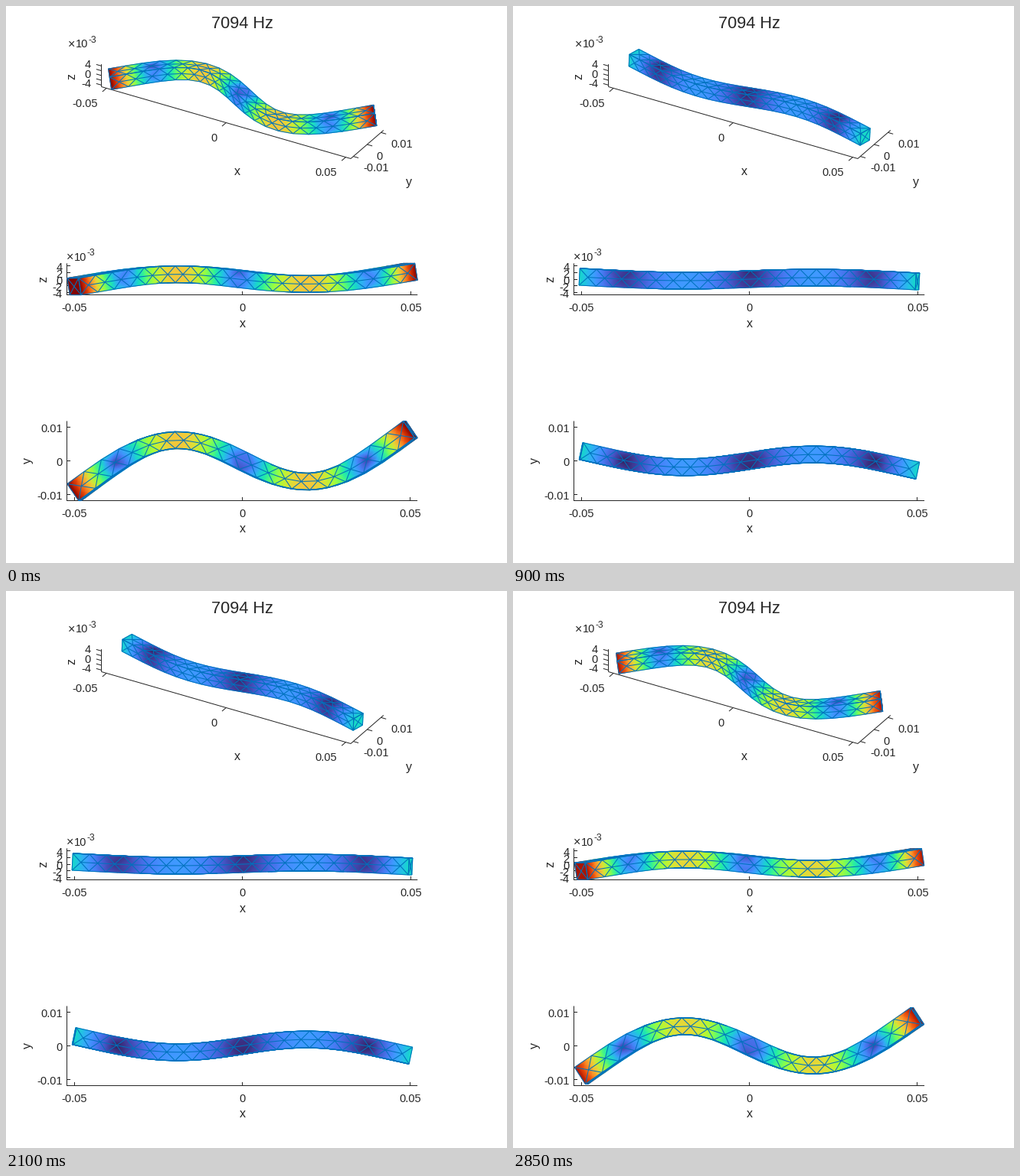
These frames come from a looping animation (654x728 px, 3 s). A matplotlib script:

```python
import numpy as np
import matplotlib.pyplot as plt
from matplotlib.animation import FuncAnimation
from matplotlib.collections import LineCollection, TriMesh
from matplotlib.tri import Triangulation

W, H = 654, 728
FRAMES, INTERVAL = 20, 150
INK, EDGE = "#262626", "#0072BD"

# Beam and mode shape, lengths in mm
LENGTH, HALF, CELLS = 100.0, 2.5, 20
AMP_Y, AMP_Z = 9.36, 2.2
WAVE = 7.8532          # second free-free bending eigenvalue
TILT = 0.92            # section rotation relative to the slope
LIM_X, LIM_Y, LIM_Z = 52.1, 11.86, 4.7

plt.rcParams["font.family"] = "Liberation Sans"
fig = plt.figure(figsize=(W / 72, H / 72), dpi=72, facecolor="white")
ax = fig.add_axes([0, 0, 1, 1])
ax.set_xlim(0, W)
ax.set_ylim(H, 0)
ax.axis("off")


# ---------- mesh ----------
def side_face(turn):
    """One long face: a triangular lattice with a row of mid nodes."""
    n = CELLS
    edge = np.linspace(-LENGTH / 2, LENGTH / 2, n + 1)
    mid = (edge[:-1] + edge[1:]) / 2
    x = np.concatenate([edge, edge, mid])
    a = np.repeat([-HALF, HALF, 0], [n + 1, n + 1, n])
    c, s = [(1, 0), (0, 1), (-1, 0), (0, -1)][turn]
    points = np.column_stack([x, a * c - HALF * s, a * s + HALF * c])

    top, centre = n + 1, 2 * n + 2
    tris = [(0, centre, top), (n, top + n, centre + n - 1)]
    for i in range(n):
        b, t, m = i, top + i, centre + i
        tris += [(b, b + 1, m), (t, m, t + 1)]
        if i < n - 1:
            tris += [(m, b + 1, m + 1), (m, m + 1, t + 1)]
    return points, np.array(tris)


def end_face(sign):
    """A square cap split into four triangles around its middle."""
    y = HALF * np.array([-1, 1, 1, -1, 0])
    z = HALF * np.array([-1, -1, 1, 1, 0])
    points = np.column_stack([np.full(5, sign * LENGTH / 2), y, z])
    tris = np.array([(k, (k + 1) % 4, 4) for k in range(4)])
    return points, tris if sign > 0 else tris[:, ::-1]


def join(parts):
    points, tris, start = [], [], 0
    for p, t in parts:
        points.append(p)
        tris.append(t + start)
        start += len(p)
    return np.vstack(points), np.vstack(tris)


def splitter(n):
    """Barycentric weights and triangles that split a triangle n by n."""
    spots = [(i, j) for i in range(n + 1) for j in range(n + 1 - i)]
    at = {p: k for k, p in enumerate(spots)}
    weights = np.array([(n - i - j, i, j) for i, j in spots]) / n
    tris = []
    for i, j in spots:
        if i + j < n:
            tris.append((at[i, j], at[i + 1, j], at[i, j + 1]))
        if i + j < n - 1:
            tris.append((at[i + 1, j], at[i + 1, j + 1], at[i, j + 1]))
    return weights, np.array(tris)


REST, TRIS = join([side_face(k) for k in range(4)]
                  + [end_face(-1), end_face(1)])
WEIGHTS, SUBTRIS = splitter(3)


def mode_shift(p):
    x, y, z = p.T
    u, e = WAVE * x / LENGTH, WAVE / 2
    shape = (np.sin(u) / np.sin(e) + np.sinh(u) / np.sinh(e)) / 2
    slope = (np.cos(u) / np.sin(e) + np.cosh(u) / np.sinh(e)) / 2
    slope *= WAVE / LENGTH * TILT
    return np.column_stack([-(y * AMP_Y + z * AMP_Z) * slope,
                            AMP_Y * shape, AMP_Z * shape])


SHIFT = mode_shift(REST)
SIZE = np.linalg.norm(SHIFT, axis=1)
SIZE /= SIZE.max()


# ---------- views: (origin in px, px per mm, right vector, up vector) ----------
R3 = np.sqrt(3) / 2
ISO = ((308.7, 119.3), 3.607, (R3, 0.5, 0), (-0.25, R3 / 2, R3))
FRONT = ((308.5, 357.0), 4.39, (1, 0, 0), (0, 0, 1))
ABOVE = ((308.5, 594.5), 4.387, (1, 0, 0), (0, 1, 0))
VIEWS = (ISO, FRONT, ABOVE)


def project(p, view):
    (ox, oy), scale, right, up = view
    p = np.asarray(p, float)
    return np.stack([ox + scale * (p @ np.array(right)),
                     oy - scale * (p @ np.array(up))], axis=-1)


# ---------- axes and lettering ----------
def line(p, q):
    ax.plot([p[0], q[0]], [p[1], q[1]], color=INK, lw=1, zorder=1,
            solid_capstyle="butt", snap=False)


def pixel(v):
    """Centre of the pixel that holds v."""
    return np.floor(v) + 0.5


def text(x, base, s, size=14.67, ha="center", turn=0):
    ax.text(x, base, s, size=size, color=INK, ha=ha, va="baseline",
            rotation=turn, rotation_mode="anchor", zorder=1)


def ticklabel(x, y, s, ha="center"):
    text(x, y + 5.3, s, ha=ha)


def exponent(x, base):
    text(x, base, "×", 16)
    text(x + 5.3, base, "10", ha="left")
    text(x + 22, base - 7, "-3", 12, ha="left")


def iso_axes():
    def spot(x, y, z=-LIM_Z):
        return project((x, y, z), ISO)

    def tick(p, direction):
        d = np.array(direction)
        line(p, p + 7 * d / np.hypot(*d))

    near, far = spot(-LIM_X, -LIM_Y), spot(LIM_X, -LIM_Y)
    top = spot(-LIM_X, -LIM_Y, LIM_Z)
    line((pixel(near[0]), near[1]), (pixel(top[0]), top[1]))
    line(near, far)
    line(far, spot(LIM_X, LIM_Y))
    for v in (-4, -2, 0, 2, 4):
        tick(spot(-LIM_X, -LIM_Y, v), (-R3, -0.25))
    for v in (-50, 0, 50):
        tick(spot(v, -LIM_Y), (-0.5, R3 / 2))
    for v in (-10, 0, 10):
        tick(spot(LIM_X, v), (R3, 0.25))

    for s, y in (("4", 76), ("0", 88.5), ("-4", 100.5)):
        ticklabel(111, y, s, "right")
    for s, x, y in (("-0.05", 103, 127), ("0", 272, 172), ("0.05", 418, 217),
                    ("0.01", 517, 180), ("0", 488, 196), ("-0.01", 483, 211)):
        ticklabel(x, y, s)
    exponent(86, 54.5)
    text(302, 221, "x", 16)
    text(526, 235, "y", 16)
    text(90, 92, "z", 16, turn=90)


def flat_axes(view, limit, ticks, label_x, name, name_x):
    (ox, oy), scale = view[:2]
    left, right = pixel(ox - LIM_X * scale), ox + LIM_X * scale
    low, high = pixel(oy + limit * scale), oy - limit * scale
    line((left, high), (left, low + 0.5))
    line((left, low), (right, low))
    for v, s in ((-50, "-0.05"), (0, "0"), (50, "0.05")):
        x = pixel(ox + v * scale)
        line((x, low), (x, low - 4.6))
        ticklabel(x, low + 16, s)
    for v, s in ticks:
        y = pixel(oy - v * scale)
        line((left, y), (left + 4.6, y))
        ticklabel(label_x, y + 0.8, s, "right")
    text(309, low + 42, "x", 16)
    text(name_x, oy, name, 16, turn=90)


text(308, 29, "7094 Hz", 21.8)
iso_axes()
flat_axes(FRONT, LIM_Z, [(v, str(v)) for v in (-4, -2, 0, 2, 4)], 73.5, "z", 53)
flat_axes(ABOVE, LIM_Y, [(-10, "-0.01"), (0, "0"), (10, "0.01")], 74, "y", 33)
exponent(84, 333)


# ---------- animation ----------
wires = []
for _ in VIEWS:
    wire = LineCollection([], colors=EDGE, linewidths=1.05, zorder=3,
                          snap=False)
    ax.add_collection(wire, autolim=False)
    wires.append(wire)
fills = []


def shade(flat, tris, level):
    """Smooth colour over the visible triangles."""
    xy = np.einsum("wk,tkd->twd", WEIGHTS, flat[tris]).reshape(-1, 2)
    value = (level[tris] @ WEIGHTS.T).ravel()
    offsets = np.arange(len(tris))[:, None, None] * len(WEIGHTS)
    cells = (SUBTRIS[None] + offsets).reshape(-1, 3)
    fill = TriMesh(Triangulation(xy[:, 0], xy[:, 1], cells),
                   cmap="turbo", zorder=2)
    fill.set_array(value)
    fill.set_clim(0, 1)
    ax.add_collection(fill, autolim=False)
    fills.append(fill)


def draw(frame):
    swing = np.cos(2 * np.pi * frame / FRAMES)
    body = REST + swing * SHIFT
    level = SIZE * abs(swing)
    while fills:
        fills.pop().remove()
    for view, wire in zip(VIEWS, wires):
        flat = project(body, view)
        a, b, c = (flat[TRIS[:, k]] for k in range(3))
        u, v = b - a, c - a
        facing = u[:, 0] * v[:, 1] - u[:, 1] * v[:, 0] < -1e-6
        tris = TRIS[facing]
        shade(flat, tris, level)
        pairs = np.vstack([tris[:, [0, 1]], tris[:, [1, 2]], tris[:, [2, 0]]])
        wire.set_segments(flat[np.unique(np.sort(pairs, axis=1), axis=0)])
    return fills + wires


anim = FuncAnimation(fig, draw, frames=FRAMES, interval=INTERVAL,
                     init_func=lambda: draw(0), repeat=True, repeat_delay=0)
plt.show()
```
